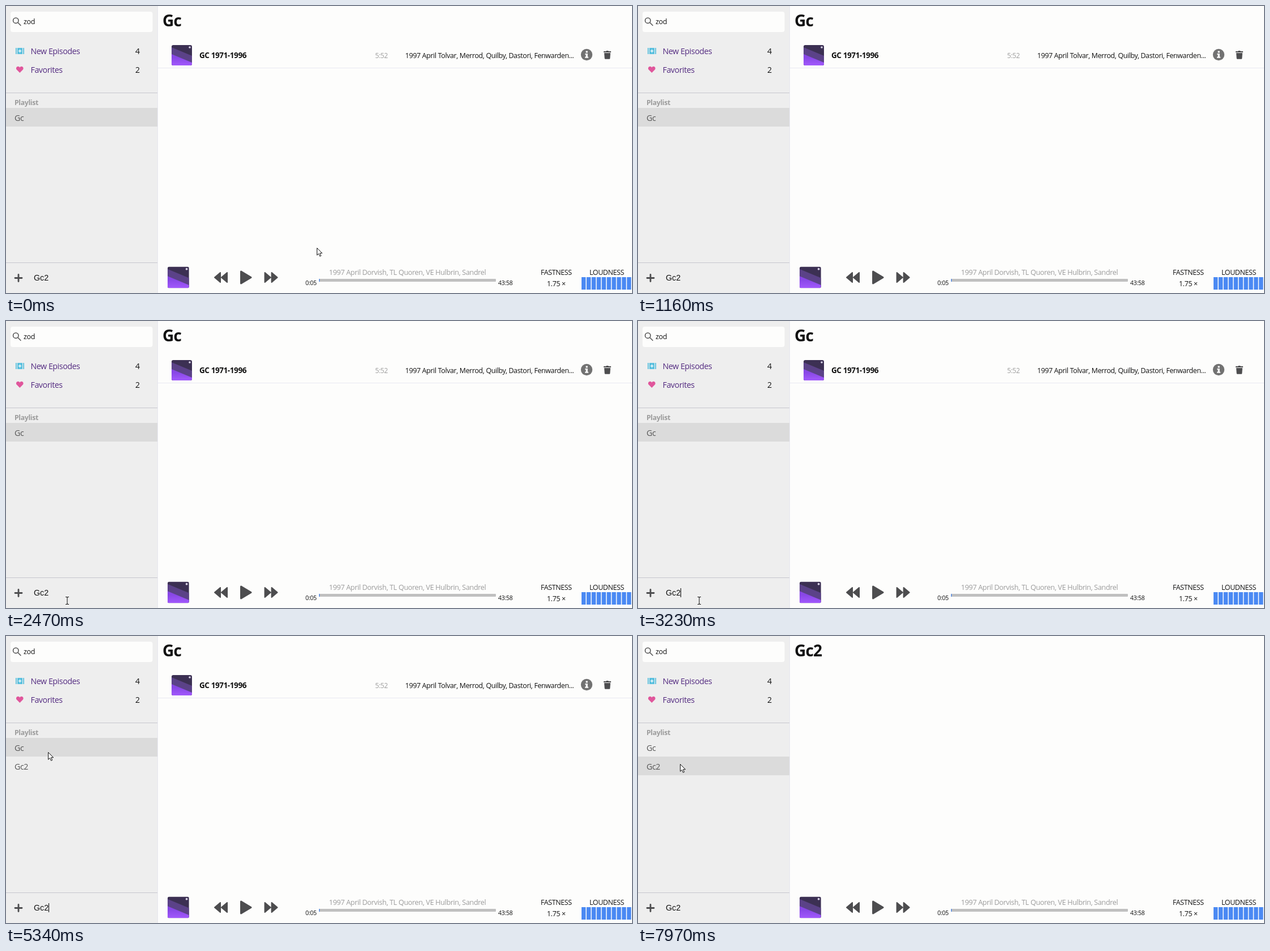
An HTML page that plays this animation: 1104 px wide and 507 px high, repeating every 8000 ms.

```html
<!DOCTYPE html>
<html lang="en">
<head>
<meta charset="utf-8">
<title>Podcast player</title>
<style>
html, body { margin: 0; width: 100%; height: 100%; overflow: hidden; background: #fdfdfc; }
svg { display: block; }
text { font-family: "Open Sans", "Noto Sans", sans-serif; letter-spacing: -0.03em; fill: #111; white-space: pre; }
.bold { font-weight: 700; }
.nav { font-size: 14.2px; }
.link { fill: #532a80; }
.item { fill: #555; }
.dim { fill: #9c9c9c; }
.small { font-size: 12.45px; }
.time { font-size: 10.6px; }
.field { font: 14.2px "Liberation Sans", Arial, sans-serif; letter-spacing: 0; }
.icon { fill: #4d4d4f; }
.rule { fill: #c6c6ce; }
</style>
</head>
<body>
<svg width="1104" height="507" viewBox="0 0 1104 507">
  <defs>
    <linearGradient id="violet" x2="0" y2="1">
      <stop offset=".3" stop-color="#8847e6"/>
      <stop offset="1" stop-color="#a259fc"/>
    </linearGradient>
    <clipPath id="round"><rect width="36" height="36" rx="3"/></clipPath>
    <g id="art" clip-path="url(#round)">
      <rect width="36" height="36" fill="#3c3053"/>
      <path d="M0 4 36 19V36H0z" fill="#5b4288"/>
      <path d="M0 16 36 31V36H0z" fill="url(#violet)"/>
      <circle cx="32" cy="4" r="1.8" fill="#d8d2e6"/>
    </g>
    <path id="skip" d="M1 1.5 11 10 1 18.5zM13 1.5 23 10 13 18.5z"
      class="icon" stroke="#4d4d4f" stroke-width="2" stroke-linejoin="round"/>
  </defs>

  <rect width="1104" height="507" fill="#fdfdfc"/>
  <rect width="267" height="507" fill="#eee"/>
  <rect x="267" width="1" height="507" fill="#e6e6ee"/>
  <rect x="8" y="10" width="250.5" height="36" rx="4" fill="#fdfdfc"/>
  <g fill="none" stroke="#555" stroke-width="1.6" stroke-linecap="round">
    <circle cx="17.3" cy="25.7" r="4.7"/>
    <path d="m20.9 29.3 5 5"/>
  </g>
  <text x="31" y="32" font-size="12.5">zod</text>

  <g fill="#5bc0de">
    <rect x="17" y="74" width="1.8" height="11"/>
    <rect x="20" y="74" width="9" height="11"/>
    <rect x="30.2" y="74" width="1.8" height="11"/>
    <path d="M24.5 76.8v5.4M21.8 79.5h5.4" stroke="#f4fafc" stroke-width="1.3"/>
  </g>
  <path d="M24.3 118 18.9 112.6C16.8 110 18.5 106.7 21.3 106.7 22.8 106.7 23.8 107.6 24.3 108.7 24.8 107.6 25.8 106.7 27.3 106.7 30.1 106.7 31.8 110 29.7 112.6z" fill="#e0569c"/>
  <text x="43.5" y="85" class="nav link">New Episodes</text>
  <text x="228" y="85" class="nav">4</text>
  <text x="43.5" y="118" class="nav link">Favorites</text>
  <text x="228" y="118" class="nav">2</text>

  <rect y="153" width="267" height="1" class="rule"/>
  <text x="15" y="174.5" class="bold dim" font-size="12.3">Playlist</text>
  <rect id="mark" y="180" width="267" height="33" fill="#dbdbdb"/>
  <text x="15" y="203" class="nav item">Gc</text>
  <text x="15" y="236" class="nav item" id="added">Gc2</text>
  <rect y="453" width="267" height="1" class="rule"/>
  <path d="M22 474.5v12M16 480.5h12" stroke="#4d4d4f" stroke-width="2.8" stroke-linecap="round"/>
  <text x="49" y="485" class="field">Gc2</text>
  <rect id="caret" x="75" y="472" width="1" height="16"/>

  <text id="title" x="276" y="36" class="bold" font-size="28"></text>
  <g id="row">
    <use href="#art" x="292" y="69"/>
    <text x="341" y="92" class="bold" font-size="13.5">GC 1971-1996</text>
    <text x="651" y="92" class="dim" font-size="12">5:52</text>
    <text x="704" y="92" class="small">1997 April Tolvar, Merrod, Quilby, Dastori, Fenwarden...</text>
    <circle cx="1024" cy="86" r="10.2" fill="#727272"/>
    <path d="M1022.6 79.5h3.2v3h-3.2zM1021.4 84h4.4v5.7h1.3v2h-6v-2h1.5v-3.7h-1.2z" fill="#fff"/>
    <path d="M1054 80h4l1-1h3l1 1h4v2h-13zM1055 83h11l-.7 9.6q-.1 1.2-1.3 1.2h-7q-1.2 0-1.3-1.2z" class="icon"/>
    <rect x="268" y="109" width="836" height="1" fill="#e9e9f2"/>
  </g>

  <use href="#art" transform="translate(285 460.5) scale(1.05)"/>
  <use href="#skip" transform="translate(391 469.5) scale(-1 1)"/>
  <path d="M414.5 469 432 479.5 414.5 490z" class="icon" stroke="#4d4d4f" stroke-width="3" stroke-linejoin="round"/>
  <use href="#skip" x="455.5" y="469.5"/>
  <text x="708" y="475" class="dim" font-size="12.65" text-anchor="middle">1997 April Dorvish, TL Quoren, VE Hulbrin, Sandrel</text>
  <text x="528" y="493" class="time">0:05</text>
  <rect x="552" y="482" width="312" height="5" rx="1" fill="#c0c0c0"/>
  <rect x="552" y="482" width="1.2" height="5" fill="#3f7fe8"/>
  <text x="868" y="493" class="time">43:58</text>
  <text x="943" y="475" class="small">FASTNESS</text>
  <text x="954" y="495" class="small">1.75 ×</text>
  <text x="1029" y="475" class="small">LOUDNESS</text>
  <g id="bars" fill="#4a89f3"></g>

  <path id="arrow" d="M.5.5V13.2L3.4 10.5 5.5 15.2 7.6 14.3 5.6 9.7H9.6z" fill="#fff" stroke="#111" stroke-width="1"/>
  <path id="beam" d="M-3 -6.5H-1Q0 -6.5 0 -5.5 0 -6.5 1 -6.5H3M0 -6V6M-3 6.5H-1Q0 6.5 0 5.5 0 6.5 1 6.5H3" fill="none" stroke="#111" stroke-width="1"/>
</svg>
<script>
const LOOP = 8000, ADD = 4100, SELECT = 6170;
const CARET_ON = 2900, CARET_OFF = 5970;

// pointer path: time, x, y
const path = [
  [0, 548, 427], [30, 548, 427], [350, 538, 468], [650, 530, 512],
  [1600, 150, 516], [1950, 122, 503], [2300, 108, 494],
  [4830, 108, 494], [5000, 117, 380], [5130, 101, 220],
  [5220, 80, 149], [5340, 74, 205], [5540, 74, 226], [LOOP, 74, 226]
];

const $ = id => document.getElementById(id);
const show = (id, on) => { $(id).style.display = on ? "" : "none"; };

for (let i = 0; i < 10; i++) {
  const bar = document.createElementNS("http://www.w3.org/2000/svg", "rect");
  const box = { x: 1015 + i * 8.9, y: 479, width: 7.4, height: 22 };
  for (const key in box) bar.setAttribute(key, box[key]);
  $("bars").append(bar);
}

function pointerAt(t) {
  const i = path.findIndex(step => step[0] > t);
  const [t0, x0, y0] = path[i - 1], [t1, x1, y1] = path[i];
  const k = (t - t0) / (t1 - t0);
  return [x0 + (x1 - x0) * k, y0 + (y1 - y0) * k];
}

function draw(t) {
  const [x, y] = pointerAt(t);
  const overField = x < 267 && y > 454;
  const selected = t >= SELECT;
  for (const id of ["arrow", "beam"])
    $(id).setAttribute("transform", `translate(${Math.round(x)} ${Math.round(y)})`);
  show("arrow", !overField);
  show("beam", overField);
  show("caret", t >= CARET_ON && t < CARET_OFF);
  show("added", t >= ADD);
  show("row", !selected);
  $("mark").setAttribute("y", selected ? 213 : 180);
  $("title").textContent = selected ? "Gc2" : "Gc";
}

const start = performance.now();
function tick() {
  draw((performance.now() - start) % LOOP);
  requestAnimationFrame(tick);
}
tick();
</script>
</body>
</html>
```
